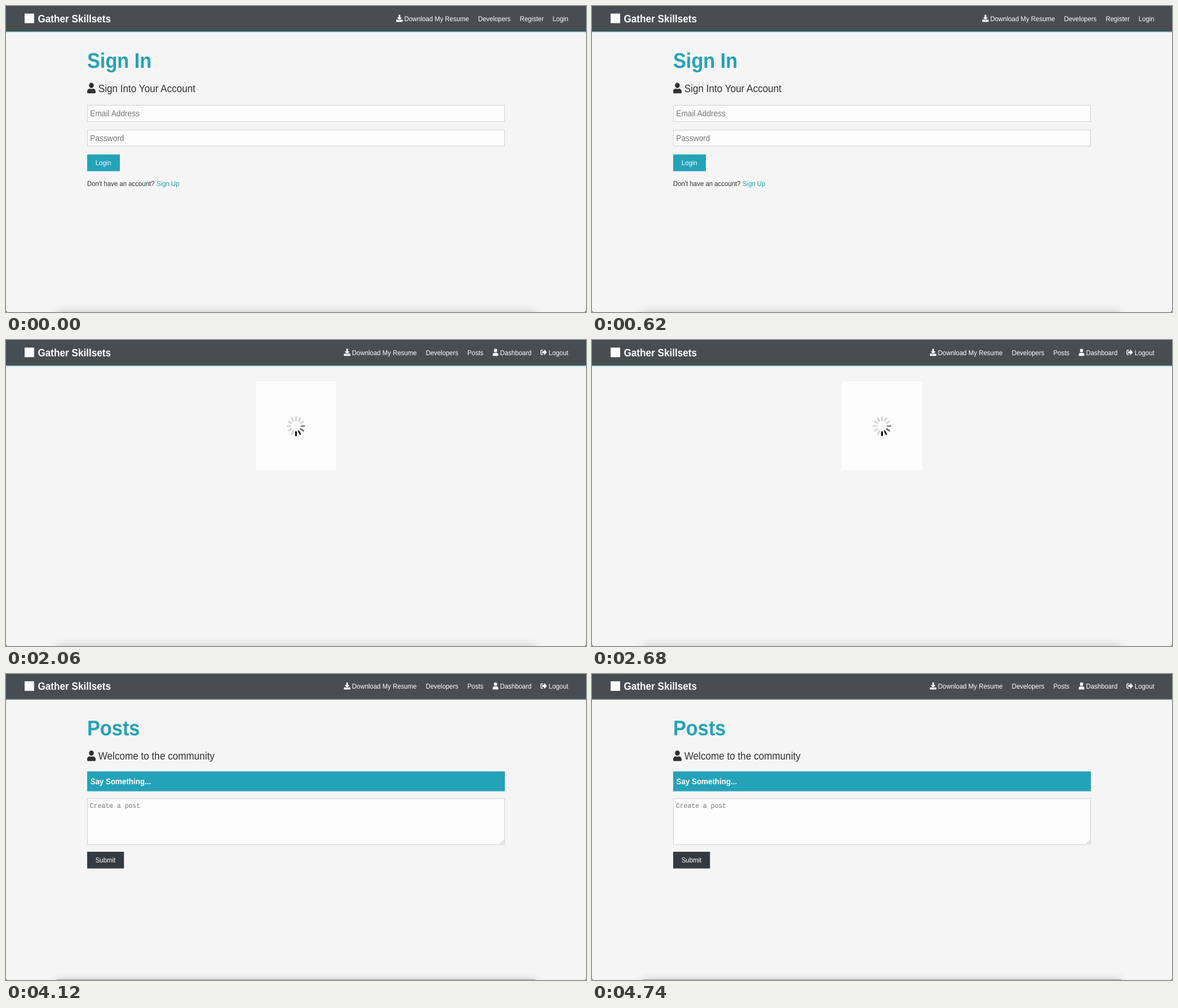
These frames come from a looping animation (1029x544 px, 5.15 s). An HTML page:

```html
<!DOCTYPE html>
<html lang="en">
<head>
<meta charset="utf-8">
<title>Portfolio site tour</title>
<style>
  html, body { margin: 0; width: 100%; height: 100%; overflow: hidden; background: #f5f5f5; }
  svg { display: block; width: 1029px; height: 544px; }
  text { font-family: "Liberation Sans", Arial, sans-serif; text-rendering: geometricPrecision; white-space: pre; }
  .bold { font-weight: 700; }
  .mono { font-family: "Liberation Mono", monospace; }
</style>
</head>
<body>
<svg id="stage" viewBox="0 0 1029 544">
  <defs>
    <filter id="soft" x="-10%" y="-300%" width="120%" height="700%">
      <feGaussianBlur stdDeviation="8"/>
    </filter>
  </defs>
</svg>
<script>
const HOLD = 1030;
const SQUEEZE = 0.91; // the whole page is slightly narrowed
const SMALL = 12.56, FIELD = 15.07, LEAD = 18.84, TITLE = 37.7;
const INK = '#2f3133', TEAL = '#24a2b8', DARK = '#343a40', RED = '#dc3547', HINT = '#757575', WHITE = '#fff';

// Icons on a grid 512 units high
const ICONS = {
  user: 'M224 0a128 128 0 1 1 0 256 128 128 0 1 1 0-256zM134 288h17q73 32 146 0h17c74 0 134 60 134 134v42q0 48-48 48H48q-48 0-48-48v-42c0-74 60-134 134-134z',
  download: 'M216 0h80q24 0 24 24v168h88c18 0 27 21 14 34L270 378q-14 14-28 0L90 226c-13-13-4-34 14-34h88V24q0-24 24-24zM24 352h147l49 49q36 32 72 0l49-49h147q24 0 24 24v112q0 24-24 24H24q-24 0-24-24V376q0-24 24-24z',
  logout: 'M497 273L329 441c-15 15-41 4-41-17v-96H152q-24 0-24-24v-96q0-24 24-24h136V88c0-21 26-32 41-17l168 168q14 17 0 34zM192 436v-40q0-12-12-12H96q-32 0-32-32V160q0-32 32-32h84q12 0 12-12V76q0-12-12-12H96c-53 0-96 43-96 96v192c0 53 43 96 96 96h84q12 0 12-12z',
  profile: 'M248 8a248 248 0 1 0 0 496 248 248 0 1 0 0-496zM248 104a88 88 0 1 1 0 176 88 88 0 1 1 0-176zM248 448c-59 0-111-27-146-68 19-35 56-60 98-60q48 20 96 0c42 0 79 25 98 60-35 41-87 68-146 68z',
  cap: 'M622 153L344 67q-24-7-47 0L18 153c-24 7-24 41 0 48l49 15q-17 20-18 46-17 9-17 28 0 17 14 26L20 430q-2 20 15 20h58q18 0 15-20L82 316q14-9 14-26 0-18-16-27 1-20 17-32l200 62q24 7 47 0l278-86c24-7 24-47 0-54zM353 323q-33 9-66 0l-145-45-14 106c0 35 86 64 192 64s192-29 192-64l-14-106z'
};

const rect = (x, y, w, h, fill, extra = '') =>
  `<rect x="${x}" y="${y}" width="${w}" height="${h}" fill="${fill}" ${extra}/>`;
const text = (x, y, words, size = SMALL, fill = INK, style = '') =>
  `<text transform="translate(${x} ${y}) scale(${SQUEEZE} 1)" font-size="${size}" fill="${fill}" class="${style}">${words}</text>`;
const icon = (name, x, y, size = SMALL, fill = INK) =>
  `<path d="${ICONS[name]}" fill="${fill}" fill-rule="evenodd" transform="translate(${x} ${y}) scale(${size / 512 * SQUEEZE} ${size / 512})"/>`;
const move = (x, y, content) => `<g transform="translate(${x} ${y})">${content}</g>`;
const field = (y, h, fill = '#fdfdfd') =>
  rect(144.5, y + 0.5, 740, h - 1, fill, 'stroke="#cfcfcf"');
const button = (x, y, w, label, fill) =>
  rect(x, y, w, 29.7, fill) + text(x + 14.7, y + 18.8, label, SMALL, WHITE);
const heading = (x, title, lead) =>
  text(x, 110, title, TITLE, TEAL, 'bold') +
  icon('user', x, 136.5, LEAD) + text(x + 19.7, 153, lead, LEAD);

const navText = (x, words) => text(x, 26.6, words, SMALL, WHITE);
const navIcon = (name, x) => icon(name, x, 15.6, SMALL, WHITE);
const guestLinks = navIcon('download', 692.3) + navText(706.5, 'Download My Resume') +
  navText(837.5, 'Developers') + navText(911.5, 'Register') + navText(969.7, 'Login');
const memberLinks = navIcon('download', 599.5) + navText(613.8, 'Download My Resume') +
  navText(744.7, 'Developers') + navText(818.5, 'Posts') +
  navIcon('user', 863.5) + navText(876.5, 'Dashboard') +
  navIcon('logout', 948.3) + navText(962.8, 'Logout');

function navbar(links, width = 1029, line = '#2b9db1') {
  return rect(0, -2, width, 47.4, '#484d51') + rect(0, 45.4, width, 1, line) +
    rect(33, 13.5, 17, 17, WHITE) +
    text(56.5, 29, 'Gather Skillsets', LEAD, WHITE, 'bold') + links;
}

// Shadow rising from below the window, and the window's dark bottom corners
function windowEdge(lined) {
  return rect(90, 544, 849, 30, '#000', 'opacity=".2" filter="url(#soft)"') +
    (lined ? rect(90, 543, 849, 1, '#989898') : '') +
    '<path d="M0 541q0 3 3 3H0zM1029 541q0 3-3 3h3z" fill="#222"/>';
}

function signIn(fields) {
  return heading(144, 'Sign In', 'Sign Into Your Account') + fields +
    button(144, 264, 58, 'Login', TEAL) +
    text(144, 320, "Don't have an account?") + text(267, 320, 'Sign Up', SMALL, TEAL);
}

const emptyFields = field(176, 30) + text(149.3, 196.2, 'Email Address', FIELD, HINT) +
  field(220, 29.5) + text(149.3, 240, 'Password', FIELD, HINT);
const filledFields = field(176, 29.5, '#e8f0fe') +
  text(149.3, 196, 'mowrunen@in.example', FIELD, '#111') +
  rect(145, 221, 739, 27.4, '#fdfdfd', 'rx="2" stroke="#2367b5" stroke-width="1.8"') +
  text(149.3, 240, '••••••', FIELD, '#111');

function spinner() {
  const tail = ['#000', '#252525', '#707070', '#858585'];
  let bars = '';
  for (let i = 0; i < 12; i++) {
    bars += `<line y1="-10.6" y2="-16.4" stroke="${tail[i] || '#d3d3d3'}" transform="rotate(${180 - i * 30})"/>`;
  }
  return rect(443, 74, 143, 157, '#fdfdfd') +
    `<g transform="translate(514.5 153) scale(${SQUEEZE} 1)" stroke-width="3.2" stroke-linecap="round">${bars}</g>`;
}

function tableRow(y, company, title, years) {
  return text(151.7, y, company) + text(391.7, y, title) + text(495.3, y, years) +
    button(645, y - 18.2, 62.5, 'Delete', RED);
}

function dashboard() {
  const pale = '#f4f4f4';
  const actions = rect(139, 173.5, 99, 29.5, pale) + rect(244, 173.5, 123, 29.5, pale) + rect(373, 173.5, 120, 29.5, pale) +
    icon('profile', 153.5, 181.2, SMALL, TEAL) + text(167.7, 192, 'Edit Profile') +
    rect(259, 182.2, 9.8, 10.8, TEAL) + text(271.3, 192, 'Add Experience') +
    icon('cap', 387.5, 181.2, SMALL, TEAL) + text(404, 192, 'Add Education');
  const head = (y, labels) => rect(139, y - 26, 586, 43, pale) +
    labels.map(([x, label]) => text(x, y, label, SMALL, INK, 'bold')).join('');
  const scrollbar = rect(1018, 0, 11, 544, '#fafafa') + rect(1018, 0, 1, 544, '#e9e9e9') +
    rect(1021, 1.5, 6, 342, '#c1c1c1', 'rx="3"');
  return heading(138.7, 'Dashboard', 'Welcome Tuan Ji') + actions +
    text(138.7, 250, 'Experience Credentials', LEAD, INK, 'bold') +
    head(311.3, [[151.7, 'Company'], [391.7, 'Title'], [495.3, 'Years']]) +
    tableRow(362.2, 'VELDRASTE Reusable Components LTD.', 'Web Developer', '2016/09/26 - 2019/12/20') +
    tableRow(418.8, 'Dorifund', 'Software Tester', '2011/08/15 - 2013/10/25') +
    text(138.7, 491, 'Education Credentials', LEAD, INK, 'bold') +
    head(551.6, [[151.7, 'School'], [302.5, 'Degree'], [493.3, 'Years']]) + scrollbar;
}

function posts() {
  return move(0, -0.6, heading(144, 'Posts', 'Welcome to the community')) +
    rect(144, 173.2, 741, 35.3, TEAL) +
    text(149.5, 196, 'Say Something...', 14.7, WHITE, 'bold') +
    field(221, 82.5) + text(149, 238, 'Create a post', SMALL, HINT, 'mono') +
    '<path d="M877.5 302l6-6M881 302l2.5-2.5" stroke="#888" stroke-width=".8"/>' +
    button(144, 316, 65.3, 'Submit', DARK);
}

const scenes = [
  navbar(guestLinks) + signIn(emptyFields) + windowEdge(false),
  move(0, -1.1, navbar(guestLinks, 1029, '#75858c') + signIn(filledFields)) + windowEdge(true),
  navbar(memberLinks) + spinner() + windowEdge(false),
  navbar(move(-10.8, 0, memberLinks), 1018) + dashboard() + windowEdge(false),
  move(0, -0.6, navbar(memberLinks, 1029, '#5c8d9a')) + posts() + windowEdge(true)
];

const stage = document.getElementById('stage');
stage.insertAdjacentHTML('beforeend',
  rect(0, 0, 1029, 544, '#f5f5f5') + scenes.map(s => `<g class="scene">${s}</g>`).join(''));
const groups = [...stage.querySelectorAll('.scene')];

function draw() {
  const current = Math.floor(performance.now() / HOLD) % groups.length;
  groups.forEach((group, i) => { group.style.display = i === current ? '' : 'none'; });
  requestAnimationFrame(draw);
}
draw();
</script>
</body>
</html>
```
